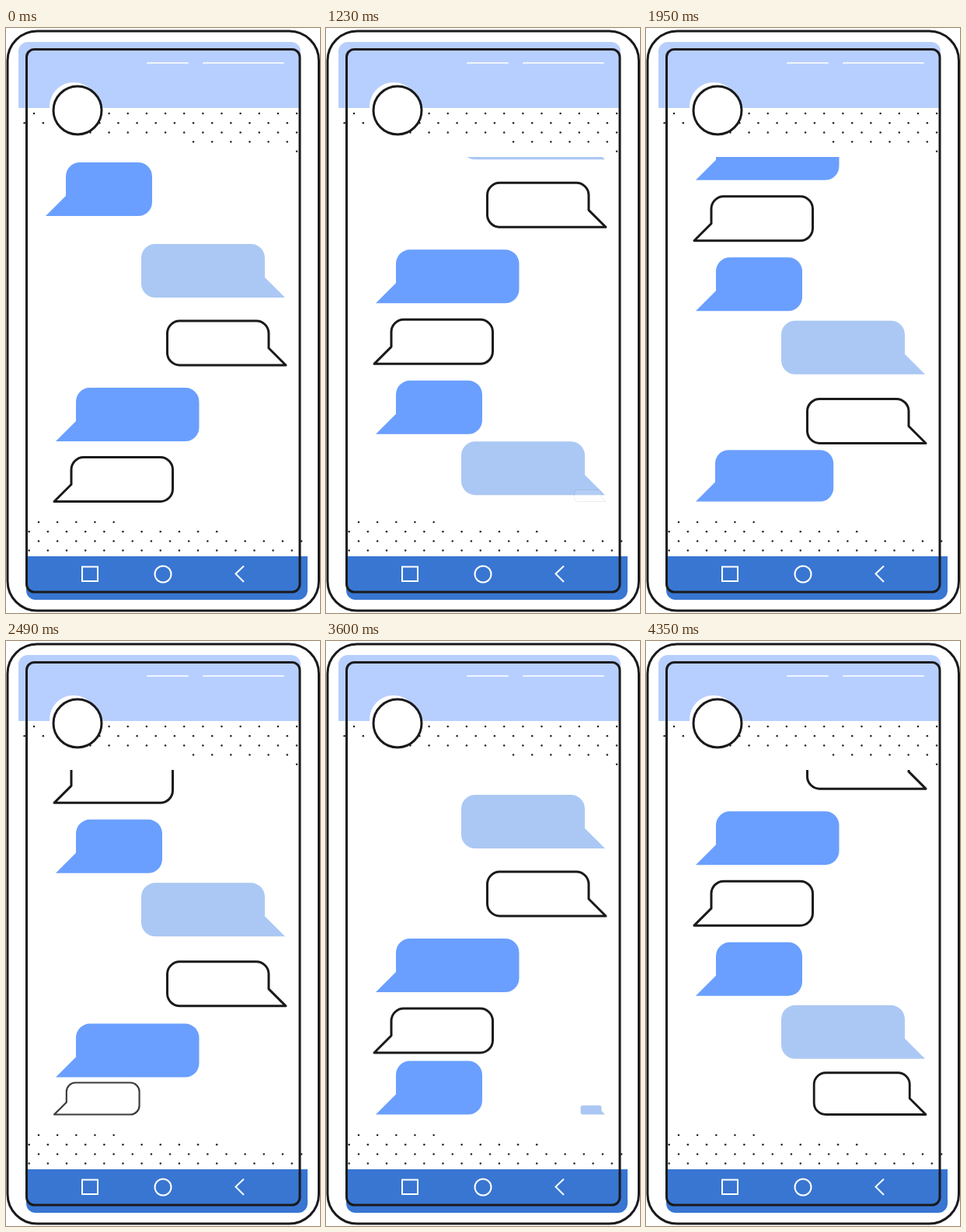
Write an HTML page that moves like this. It is 404x753 px and loops after 4380 ms.

```html
<!DOCTYPE html>
<html lang="en">
<head>
<meta charset="utf-8">
<title>Chat on a phone</title>
<style>
  html, body { margin: 0; width: 100%; height: 100%; overflow: hidden; background: #fff; }
  svg { display: block; width: 100%; height: 100%; }
  .ink { fill: none; stroke: #1a1a1c; stroke-width: 3; stroke-linejoin: round; }
  .icon { fill: none; stroke: #fff; stroke-width: 2; }
</style>
</head>
<body>
<svg viewBox="0 0 404 753">
  <defs><clipPath id="screen"><rect y="166" width="404" height="500"/></clipPath></defs>
  <rect class="ink" x="2" y="4" width="400.5" height="746" rx="38"/>
  <path fill="#b7cfff" d="M16 103V30a12 12 0 0 1 12-12H367a12 12 0 0 1 12 12V103Z"/>
  <path fill="#3876d2" d="M26 680H388V724a12 12 0 0 1-12 12H38a12 12 0 0 1-12-12Z"/>
  <path class="icon" stroke-linecap="round" opacity=".8" d="M182 45H234M254 45H357"/>
  <path class="icon" d="M98 693.5H118V712H98ZM306 692.5L295.5 702.5L306 713"/>
  <circle class="icon" cx="202" cy="703" r="10.5"/>
  <g id="dots" fill="#222"></g>
  <circle cx="87" cy="101" r="31" fill="#fff"/>
  <circle class="ink" cx="92" cy="106" r="31" style="fill:#fff"/>
  <g id="chat" clip-path="url(#screen)"></g>
  <rect class="ink" x="26.5" y="27.5" width="351.5" height="698.5" rx="10"/>
</svg>
<script>
const LOOP = 4380, CYCLE = 3030, STEP = 30, MOVE = 150;
const FLOOR = 609.5, MIN_SCALE = 0.17;

function add(parent, tag, attributes) {
  const node = document.createElementNS("http://www.w3.org/2000/svg", tag);
  for (const key in attributes) node.setAttribute(key, attributes[key]);
  return document.getElementById(parent).appendChild(node);
}

// Staggered dots, cut off along a slanted edge
function dotBand(left, top, rows, isInside) {
  for (let row = 0; row < rows; row++)
    for (let column = 0; column < 15; column++) {
      const x = left + 24.15 * column - 12.3 * (row % 2);
      if (isInside(x, row)) add("dots", "circle", { cx: x, cy: top + 12.2 * row, r: 1.25 });
    }
}
dotBand(36, 110, 5, (x, row) => x > 100 + 135 * (row - 2));
dotBand(42, 636, 4, (x, row) => x < 142 + 132 * row);

// Speech bubble with the tip of its tail at the origin, body to the right
function bubblePath(width, height, tail, r) {
  return `M0 0L${tail} ${-tail}V${r - height}a${r} ${r} 0 0 1 ${r} ${-r}H${width - r}` +
    `a${r} ${r} 0 0 1 ${r} ${r}V${-r}a${r} ${r} 0 0 1 ${-r} ${r}Z`;
}
const filled = (width, fill) => ({ d: bubblePath(width, 69, 26, 18), fill });
const outlined = { d: bubblePath(152.5, 57, 22, 16), class: "ink", style: "fill:#fff" };

// start: bottom edge in the opening layout; arrival: time the next copy pops up;
// push: how far its arrival lifts older messages; hop: its own first lift
const kinds = [
  { shape: filled(137, "#6a9fff"), tip: 64, side: 1, start: 242, arrival: 0, push: 80, hop: 78 },
  { shape: filled(185, "#abc8f4"), tip: 359, side: -1, start: 347, arrival: 602, push: 89, hop: 80, lead: 36 },
  { shape: outlined, tip: 360, side: -1, start: 434, arrival: 1200, push: 83.5, hop: 81.5 },
  { shape: filled(184.5, "#6a9fff"), tip: 64, side: 1, start: 532, arrival: 1826, push: 91, hop: 77.5 },
  { shape: outlined, tip: 62, side: 1, start: FLOOR, arrival: 2403, push: 94, hop: 79.5 }
];

const count = kinds.length;
const messages = [];
for (let order = -count; order < count; order++) {
  const kind = kinds[(order + count) % count];
  messages.push({ order, kind, node: add("chat", "path", kind.shape) });
}
messages[0].kind = { ...kinds[0], tip: 51 };   // the oldest message sits further left

const clamp = v => Math.min(1, Math.max(0, v));
const ease = v => { v = clamp(v); return v * v * (3 - 2 * v); };

function draw(time) {
  const progress = kinds.map(kind => (time - kind.arrival) / MOVE);
  for (const { order, kind, node } of messages) {
    const isNew = order >= 0;
    let y = isNew ? FLOOR : kind.start, scale = 1, opacity = 1;
    for (let later = Math.max(0, order + 1); later < count; later++)
      y -= (later === order + 1 ? kind.hop : kinds[later].push) * ease(progress[later]);
    if (isNew) {
      const grown = progress[order];
      scale = MIN_SCALE + (1 - MIN_SCALE) * ease(grown * 1.05);
      opacity = kind.shape === outlined
        ? clamp((grown - 0.15) * 2)
        : +(time > kind.arrival - (kind.lead || 0));
    }
    node.setAttribute("transform", `translate(${kind.tip} ${y}) scale(${kind.side * scale} ${scale})`);
    node.setAttribute("opacity", opacity);
  }
}

function tick() {
  const time = Math.floor(performance.now() % LOOP / STEP) * STEP;
  draw(time % CYCLE);
  requestAnimationFrame(tick);
}
tick();
</script>
</body>
</html>
```
